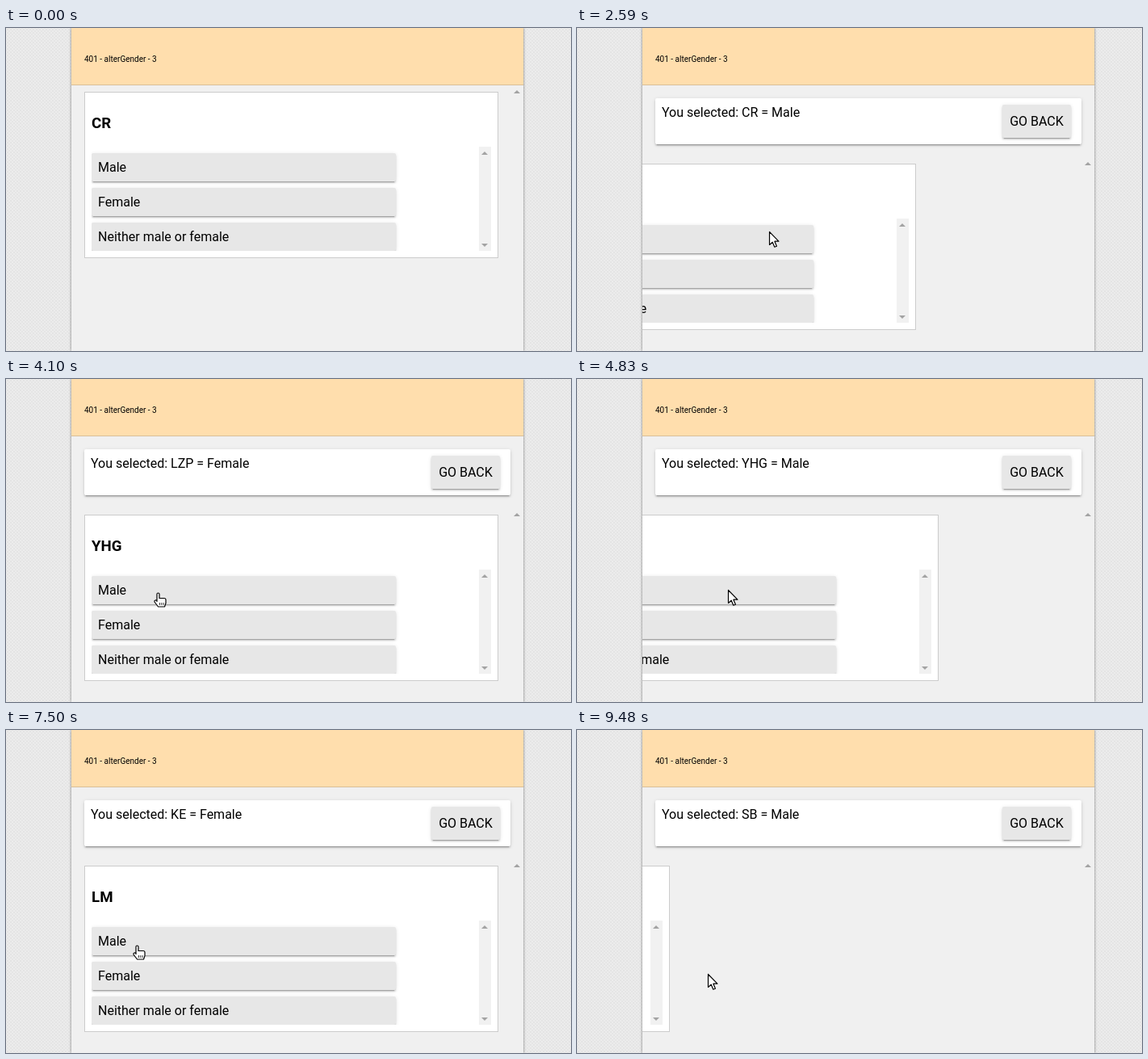
An HTML page for the animation above (9.5 s loop, 700x400 px).

```html
<!DOCTYPE html>
<html lang="en">
<head>
<meta charset="utf-8">
<title>Answer cards</title>
<style>
  html, body { margin: 0; width: 100%; height: 100%; overflow: hidden; }
  body { font: 16px/20px Roboto, sans-serif; color: #000; }
  div, svg { position: absolute; box-sizing: border-box; white-space: nowrap; }
  #stage {
    width: 700px; height: 400px; overflow: hidden;
    background:
      radial-gradient(circle, #dedede 0.5px, transparent 1px) 0 0 / 4px 4px,
      radial-gradient(circle, #e0e0e0 0.5px, transparent 1px) 2px 2px / 4px 4px,
      #ececec;
  }
  #panel { left: 81px; width: 560px; height: 400px; background: #f0f0f0; box-shadow: 0 0 3px rgba(0,0,0,.5); }
  #banner { left: 81px; width: 560px; height: 71px; background: #ffdead; border-bottom: 1px solid #d9bf98; }
  #label { left: 16px; top: 33px; font-size: 10px; line-height: 12px; }
  .raised {
    box-shadow: 0 2px 2px 0 rgba(0,0,0,.14), 0 3px 1px -2px rgba(0,0,0,.2), 0 1px 5px 0 rgba(0,0,0,.12);
    border-radius: 2px;
  }
  #notice { left: 97px; top: 87px; width: 528px; height: 57px; background: #fff; }
  #message { left: 8px; top: 8px; }
  #back { left: 430px; top: 8px; width: 85px; height: 41px; background: #e7e7e7; line-height: 41px; text-align: center; }
  #view { left: 81px; top: 71px; width: 545px; height: 329px; overflow: hidden; }
  #card { left: 16px; width: 513px; height: 206px; background: #fff; border: 1px solid #ccc; }
  #title { left: 8px; top: 27px; font-size: 18.72px; line-height: 22px; font-weight: bold; }
  #list { left: 8px; top: 67px; width: 495px; height: 129px; overflow: hidden; }
  .option { width: 377px; height: 35px; padding-left: 8px; background: #e7e7e7; line-height: 35px; }
  #track { left: 480px; width: 15px; height: 129px; background: #f1f1f1; }
  .up, .down { left: 3px; width: 0; height: 0; border: 4px solid transparent; }
  .up { top: 6px; border-top: 0; border-bottom-color: #a3a3a3; }
  .down { bottom: 5px; border-bottom: 0; border-top-color: #a3a3a3; }
  #pageArrow { left: 629px; }
  #cursor { left: 0; top: 0; width: 1px; height: 1px; overflow: visible; }
  #cursor path { fill: #fff; stroke: #000; stroke-width: 1.2; stroke-linejoin: round; }
</style>
</head>
<body>
<div id="stage">
  <div id="panel"></div>
  <div id="banner"><div id="label">401 - alterGender - 3</div></div>
  <div id="view">
    <div id="card">
      <div id="title"></div>
      <div id="list">
        <div id="track"><div class="up"></div><div class="down"></div></div>
      </div>
    </div>
  </div>
  <div id="notice" class="raised">
    <div id="message"></div>
    <div id="back" class="raised">GO BACK</div>
  </div>
  <div id="pageArrow" class="up"></div>
  <svg id="cursor">
    <path id="arrow" d="M0 0v16l3.7-3.3 2.6 6 2.6-1-2.5-6h5z"/>
    <g id="hand">
      <path d="M-1.5 10V1a1.5 1.5 0 0 1 3 0v5h6a2 2 0 0 1 2 2v4l-1.5 4.5h-8l-4.5-6a1.5 1.5 0 0 1 3-1z"/>
      <path d="M2 11.5v3m2.3-3v3m2.3-3v3" style="stroke-width:.8"/>
    </g>
  </svg>
</div>
<script>
const LOOP = 9500, SLIDE = 400, DISTANCE = 545;
const ROW = 43, ROW_HEIGHT = 35;
const TRAVEL = 650, HOVER = 220, DRIFT = 400;
const $ = id => document.getElementById(id);

// A click repaints the page at `shown`; its slide began `lag` ms earlier.
// The pointer clicks at `aim` and wanders to `drift` during the slide.
const answers = [
  { name: 'CR',  pick: 'Male',   shown: 1960, lag: 8,   aim: [283, 170], drift: [283, 170] },
  { name: 'LZP', pick: 'Female', shown: 3090, lag: 4,   aim: [209, 304], drift: [208, 288] },
  { name: 'YHG', pick: 'Male',   shown: 4410, lag: 232, aim: [187, 264], drift: [187, 261] },
  { name: 'KE',  pick: 'Female', shown: 5870, lag: 168, aim: [163, 311], drift: [152, 334] },
  { name: 'LM',  pick: 'Male',   shown: 7550, lag: 40,  aim: [162, 267], drift: [159, 259] },
  { name: 'SB',  pick: 'Male',   shown: 9040, lag: 37,  aim: [155, 256], drift: [162, 302] },
];
const entry = [623, 326];
const entryTime = answers[0].shown - HOVER - TRAVEL;

['Male', 'Female', 'Neither male or female'].forEach((text, i) => {
  const option = document.createElement('div');
  option.className = 'option raised';
  option.style.top = 8 + i * ROW + 'px';
  option.textContent = text;
  $('list').append(option);
});

const swing = p => 0.5 - Math.cos(Math.PI * Math.min(1, Math.max(0, p))) / 2;
const glide = (from, to, p) => from.map((v, i) => v + (to[i] - v) * swing(p));

function pointerAt(t, last, next) {
  const rest = last ? glide(last.aim, last.drift, (t - last.shown) / DRIFT) : entry;
  return next ? glide(rest, next.aim, (t - next.shown + HOVER + TRAVEL) / TRAVEL) : rest;
}

// The old card leaves to the right, then the new one enters from the left.
function slideAt(t, last) {
  const p = last ? (t - last.shown + last.lag) / SLIDE : 2;
  const leaving = p < 1;
  return { leaving, moving: p < 2, x: DISTANCE * (leaving ? swing(p) : swing(p - 1) - 1) };
}

function draw(t) {
  const done = answers.filter(a => a.shown <= t).length;
  const last = answers[done - 1], next = answers[done];
  const slide = slideAt(t, last);
  const current = slide.leaving ? last : next;
  const top = last ? 168 : 79;

  $('title').textContent = current ? current.name : '';
  $('card').style.top = top - 71 + 'px';
  $('card').style.transform = `translateX(${Math.round(slide.x)}px)`;
  $('pageArrow').style.top = top - 2 + 'px';
  $('notice').style.display = last ? '' : 'none';
  if (last) $('message').textContent = `You selected: ${last.name} = ${last.pick}`;

  const [x, y] = pointerAt(t, last, next).map(Math.round);
  const row = y - top - 76;
  const onOption = !slide.moving && x >= 106 && x < 483 && row >= 0 && row < 121 && row % ROW < ROW_HEIGHT;
  $('cursor').style.display = t < entryTime ? 'none' : '';
  $('cursor').style.transform = `translate(${x + 0.5}px, ${y + 0.5}px)`;
  $('hand').style.display = onOption ? '' : 'none';
  $('arrow').style.display = onOption ? 'none' : '';
}

const began = performance.now();
function tick() {
  draw((performance.now() - began) % LOOP);
  requestAnimationFrame(tick);
}
tick();
</script>
</body>
</html>
```
